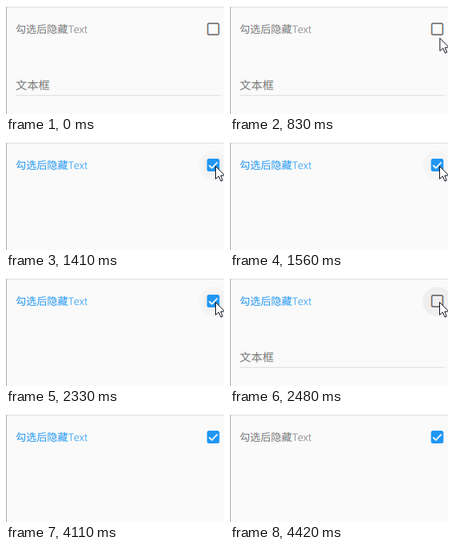
Recreate the animation shown at these times as an HTML page with a canvas. Size 273 by 136 pixels, loop 4.52 s.

```html
<!DOCTYPE html>
<html lang="zh">
<head>
<meta charset="utf-8">
<style>
html, body { margin: 0; width: 100%; height: 100%; overflow: hidden; background: #fafafa; }
canvas { display: block; width: 273px; height: 136px; }
</style>
</head>
<body>
<canvas id="stage" width="273" height="136"></canvas>
<script>
const ctx = document.getElementById('stage').getContext('2d');
const W = 273, H = 136, LOOP = 4520;
const ENTER = 570, CHECK = 1410, PRESS = 2330, UNCHECK = 2480;
const RECHECK = 3710, LEAVE = 3840, BLUR = 4420;
const FONT = 'Roboto, "Noto Sans CJK SC", "Noto Sans CJK", sans-serif';
const GREY = [116, 116, 116], BLUE = [33, 150, 243];
const ARROW = [[0, 0], [0, 16], [3.8, 12.6], [6.6, 18.8], [8.8, 17.8], [6.3, 11.8], [11.4, 11.6]];

const within = (t, from, to) => t >= from && t < to;
const rgb = parts => `rgb(${parts})`;

// Subpixel smoothing: each colour channel is painted a third of a pixel apart
function subpixel(colour, paint) {
  ctx.save();
  ctx.globalCompositeOperation = 'multiply';
  colour.forEach((value, i) => {
    const ink = [255, 255, 255];
    ink[i] = Math.min(255, Math.round(value * 255 / 250));
    ctx.fillStyle = ctx.strokeStyle = rgb(ink);
    ctx.save();
    ctx.translate((1 - i) / 3, 0);
    paint();
    ctx.restore();
  });
  ctx.restore();
}

function text(str, x, y, size, colour) {
  ctx.font = `300 ${size}px ${FONT}`;
  ctx.textRendering = 'geometricPrecision';
  subpixel(colour, () => ctx.fillText(str, x, y));
}

function rect(x, y, w, h, colour) {
  ctx.fillStyle = colour;
  ctx.fillRect(x, y, w, h);
}

function disc(r, alpha) {
  ctx.fillStyle = `rgba(0,0,0,${alpha})`;
  ctx.beginPath();
  ctx.arc(259.5, 29.5, r, 0, Math.PI * 2);
  ctx.fill();
}

function box(inset, r) {
  ctx.beginPath();
  ctx.roundRect(251.7 + inset, 21 + inset, 15.6 - 2 * inset, 16 - 2 * inset, r);
}

function checkbox(checked) {
  if (!checked) {
    ctx.lineWidth = 1.7;
    subpixel(GREY, () => { box(.9, 1.8); ctx.stroke(); });
    return;
  }
  box(0, 2.5);
  ctx.fillStyle = rgb(BLUE);
  ctx.fill();
  ctx.beginPath();
  ctx.moveTo(254.3, 29.3);
  ctx.lineTo(257.8, 32.8);
  ctx.lineTo(264.7, 25.6);
  ctx.strokeStyle = '#fff';
  ctx.lineWidth = 1.8;
  ctx.stroke();
}

// The pointer glides up to the checkbox, rests, then drops off the stage in held steps
function pointer(t) {
  if (t < ENTER) return;
  const step = Math.min(4, Math.floor((t - ENTER) / 130));
  const left = (1 - step / 4) ** 2.4;
  const drop = t < LEAVE ? 0 : 1 + Math.floor((t - LEAVE) / 135);
  const x = 262 + 2 * left;
  const y = Math.round(30 + 52 * left) + 44 * drop;

  ctx.beginPath();
  for (const [dx, dy] of ARROW) ctx.lineTo(x + dx + .5, y + dy + .5);
  ctx.closePath();
  ctx.fillStyle = '#fff';
  ctx.fill();
  ctx.strokeStyle = '#10101c';
  ctx.lineWidth = 1;
  ctx.stroke();
}

function draw(t) {
  const checked = within(t, CHECK, UNCHECK) || t >= RECHECK;

  rect(0, 0, W, H, '#fafafa');
  rect(0, 1, W, 1, '#dedede');
  rect(0, 1, 1, H, '#a8a8a8');

  if (within(t, CHECK, RECHECK)) disc(18.5, checked ? .02 : .045);
  if ([CHECK, PRESS].some(s => within(t, s, s + 150))) disc(12, .025);

  text('勾选后隐藏Text', 12, 34, 13.1, within(t, CHECK, BLUR) ? BLUE : GREY);
  checkbox(checked);

  if (!checked) {
    text('文本框', 12, 105, 14.3, GREY);
    rect(12, 112, 257, 1, '#e0e0e0');
  }
  pointer(t);
}

const start = performance.now();
function tick() {
  draw((performance.now() - start) % LOOP);
  requestAnimationFrame(tick);
}
tick();
</script>
</body>
</html>
```
